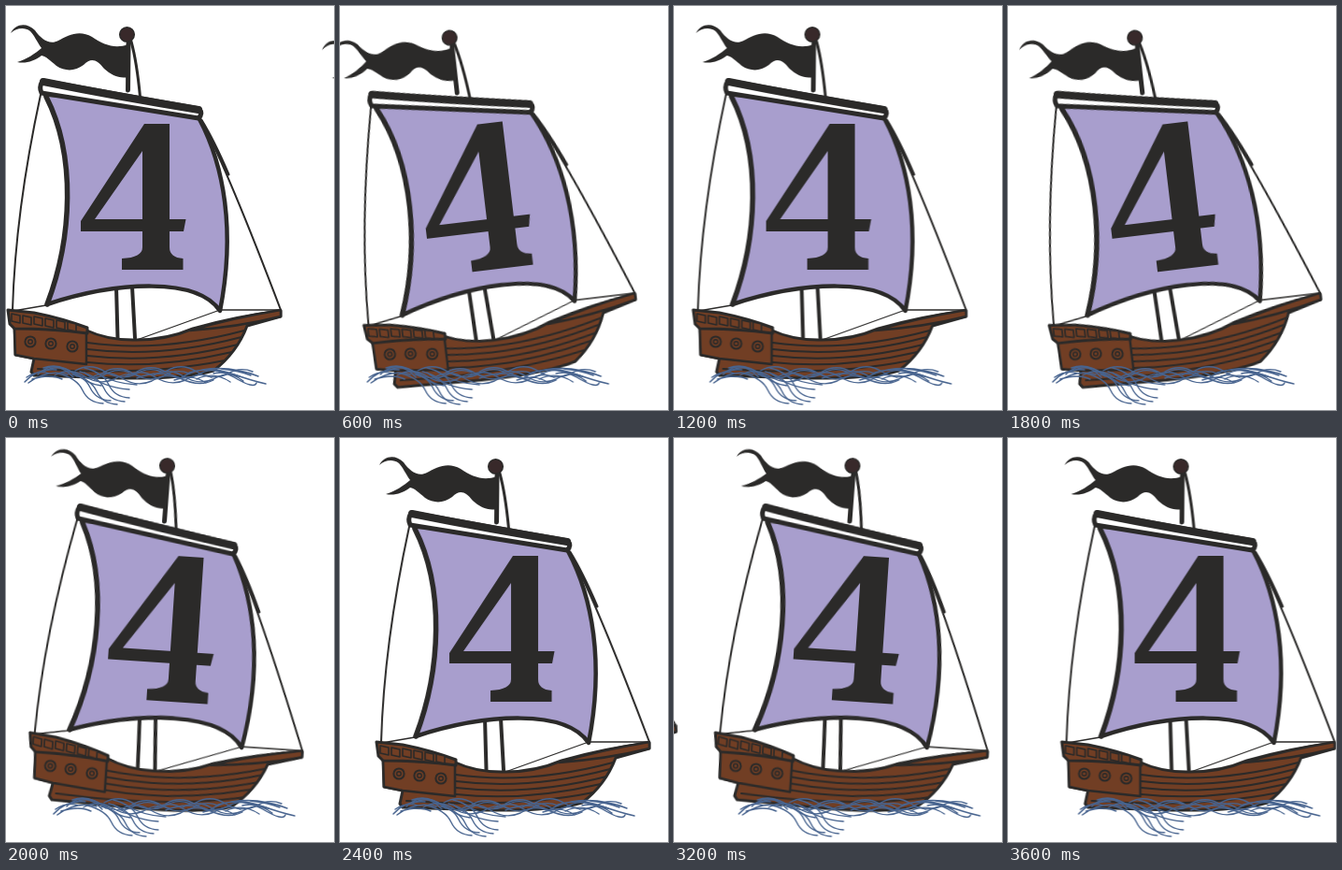
Write an HTML page without scripts that moves like this. It is 351 px wide and 432 px high and loops after 3800 ms.

```html
<!DOCTYPE html>
<html lang="en">
<head>
<meta charset="utf-8">
<title>Sailing ship number 4</title>
<style>
  html, body { margin: 0; width: 100%; height: 100%; overflow: hidden; background: #fff; }
  svg { display: block; width: 351px; height: 432px; overflow: hidden; }

  .fleet { animation: drift 3.8s steps(19) infinite; }
  .rock { transform-origin: 148px 213px; animation: rock 3.8s step-end infinite; }
  .ahead { animation-delay: -.2s; }
  .behind { animation-delay: -3.6s; }

  @keyframes drift { to { transform: translateX(58.6px); } }
  @keyframes rock {
    0%, 31.57%, 63.15%, 94.73%, 100% { transform: rotate(0deg); }
    5.26%, 36.84%, 68.42% { transform: rotate(-6.8deg); }
    10.52%, 42.1%, 73.68% { transform: rotate(-11.7deg); }
    15.78%, 47.36%, 78.94% { transform: rotate(-6.8deg); }
    21.05%, 52.63%, 84.21% { transform: rotate(3.8deg); }
    26.31%, 57.89%, 89.47% { transform: rotate(10.7deg); }
  }

  .ink { fill: #2b2a29; }
  .line { fill: none; stroke: #2b2a29; stroke-linecap: round; stroke-linejoin: round; }
  .wood { fill: #713e24; stroke: #2b2a29; stroke-linejoin: round; }
  .sea { fill: none; stroke: #48648f; stroke-width: 1.4; stroke-linecap: round; }
</style>
</head>
<body>
<svg viewBox="0 0 351 432" role="img" aria-label="Sailing ship with a 4 on its sail">
  <defs>
    <g id="port">
      <circle r="5.6" class="wood" stroke-width="2"/>
      <circle r="2.3" class="wood" stroke-width="1.4"/>
    </g>
    <path id="pane" d="M0 0l9 2v8l-9-2z" class="wood" stroke-width="1.6"/>

    <g id="ship">
      <!-- masts -->
      <path class="line" stroke-width="4" d="M118 300L119.500 355M135 300L138 355"/>
      <path class="line" stroke-width="5" d="M131 40L130.500 90"/>
      <path class="line" stroke-width="3" d="M134 38Q140 60 143.500 97"/>
      <circle cx="129.500" cy="30.500" r="7.800" fill="#38292a" stroke="#2b2a29" stroke-width="1.500"/>

      <!-- flag -->
      <path class="ink" d="M5 29C10 19 22 17 31 26C38 36 47 42 56 37C66 31 79 25 92 33C105 42 117 46 131 41V76C121 78 113 74 105 67C97 57 91 55 83 63C74 70 63 70 54 64C47 58 43 54 38 53C30 59 21 62 12 60C22 57 31 51 38 45C33 38 30 31 26 27C19 22 11 24 5 29Z"/>

      <!-- ropes -->
      <path class="line" stroke-width="2" d="M37 95Q10 220 7 325M209 122Q239 180 294 325"/>
      <path class="line" stroke-width="3" d="M209 122Q222 143 238 180"/>
      <path class="line" stroke-width="1.300" d="M43 320L8 326M229 325H294M229 325L140 357"/>

      <!-- sail -->
      <path fill="#a89ecd" d="M44 97Q120 101 206 121C229 170 250 240 229 327C205 290 120 294 43 320C70 248 76 160 44 97Z"/>
      <path class="line" stroke-width="5.500" d="M43 97C75 160 71 248 44 319"/>
      <path class="line" stroke-width="4.500" d="M44 319C120 294 205 290 229 326C246 240 233 170 207 121"/>
      <path class="line" stroke-width="4" d="M42 95Q90 97 130 105"/>

      <!-- yard -->
      <path d="M39 80L207 110Q211 115 206 120L38 93Q35 87 39 80Z" fill="#fff" stroke="#2b2a29" stroke-width="5" stroke-linejoin="round"/>
      <path class="line" stroke-width="8" d="M40 81Q120 97 206 111"/>

      <!-- number -->
      <path class="ink" fill-rule="evenodd" d="M148 126H175V228H192.500L190 241H175V258Q175 269 189.500 270V282H124V270Q146 269 146 258V241H80V230ZM146 155L95 228H146Z"/>

      <!-- hull -->
      <path class="wood" stroke-width="3" d="M9 343L84 346Q110 358 140 357Q172 357 200 345Q245 332 294 326V332L258 342Q247 371 222 390Q190 399 120 398L30 395L27 391L30 377L10 373Z"/>
      <path class="line" stroke-width="2" d="M87 360Q165 371 255 347M87 367Q165 377 252 354M87 374Q165 383 248 362M87 381Q160 389 242 370M34 388Q150 396 234 379"/>
      <path class="wood" stroke-width="2.500" d="M197 347Q240 334 294 325V332Q250 343 197 347Z"/>
      <path class="wood" stroke-width="2.500" d="M9 344L86 348V383L30 377L10 373Z"/>
      <path class="wood" stroke-width="3" d="M2 325L30 328Q60 334 87 344V350Q50 345 9 345L4 340Z"/>
      <use href="#pane" x="6" y="329"/>
      <use href="#pane" x="18" y="331"/>
      <use href="#pane" x="30" y="332"/>
      <use href="#pane" x="42" y="334"/>
      <use href="#pane" x="54" y="336"/>
      <use href="#pane" x="66" y="338"/>
      <use href="#port" x="26" y="359"/>
      <use href="#port" x="48" y="361"/>
      <use href="#port" x="71" y="364"/>
    </g>

    <path id="sweep" d="M56 393Q76 398 82 411T104 425"/>
    <path id="swell" d="M0 0q16-9 32 1t32 3q14-9 28-3"/>
    <g id="waves" class="sea">
      <path d="M20 402Q34 387 54 389M24 403Q44 388 66 394M34 394Q52 376 72 397M22 397Q34 389 46 393M40 387Q58 380 76 396M28 399Q48 393 60 399"/>
      <use href="#sweep"/>
      <use href="#sweep" x="8" y="-3"/>
      <use href="#sweep" x="15" y="1"/>
      <use href="#sweep" x="23" y="-2"/>
      <use href="#sweep" x="28" y="-6"/>
      <path d="M74 392Q86 404 102 406M84 392Q104 408 132 410M96 392Q116 404 140 405"/>
      <use href="#swell" x="40" y="391"/>
      <use href="#swell" x="52" y="395"/>
      <use href="#swell" x="74" y="390"/>
      <use href="#swell" x="92" y="397"/>
      <use href="#swell" x="104" y="392"/>
      <use href="#swell" x="128" y="396"/>
      <use href="#swell" x="140" y="391"/>
      <use href="#swell" x="158" y="395"/>
      <use href="#swell" x="172" y="390"/>
      <path d="M140 398Q165 388 186 398T222 400M188 397Q212 383 238 392T278 404M196 392Q222 384 244 397T268 403M210 389Q240 384 270 396M204 399Q222 390 240 402M180 400Q200 393 214 403M222 393Q238 389 254 401M230 388Q250 390 262 395"/>
    </g>
  </defs>

  <g class="fleet">
    <g transform="translate(-354)">
      <use href="#ship" class="rock behind"/>
      <use href="#waves"/>
    </g>
    <use href="#ship" class="rock"/>
    <use href="#waves"/>
    <g transform="translate(354)">
      <use href="#ship" class="rock ahead"/>
      <use href="#waves"/>
    </g>
  </g>
</svg>
</body>
</html>
```
